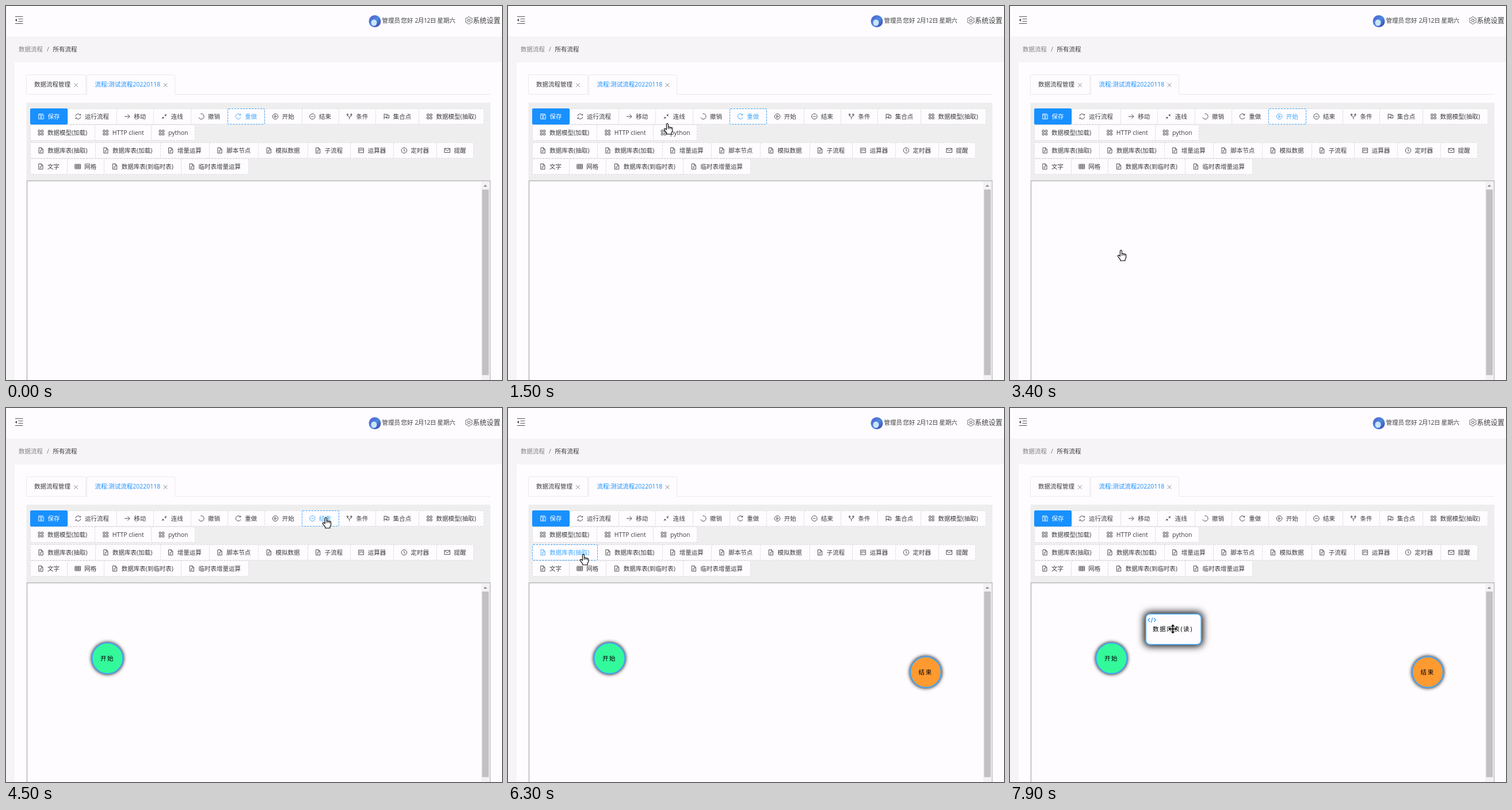
Animation, 862 px wide and 650 px high, one loop 8000 ms. Source, as an HTML page:

```html
<!DOCTYPE html>
<html lang="zh-CN">
<head>
<meta charset="utf-8">
<title>数据流程</title>
<style>
  html, body { margin: 0; width: 100%; height: 100%; overflow: hidden; background: #f6f4f6; }
  svg { display: block; width: 862px; height: 650px; }
  text { font: 10.5px "Open Sans", "Noto Sans CJK SC", "Noto Sans CJK JP", sans-serif; fill: #3c3c3c; white-space: pre; }
  .icon { fill: none; stroke: #444; stroke-width: .95; }
  .primary text { fill: #fff; }
  .primary .icon { stroke: #fff; }
  .active text { fill: #40a9ff; }
  .active .icon { stroke: #40a9ff; }
  .node text { fill: #000; font-weight: 500; letter-spacing: 1.6px; }
</style>
</head>
<body>
<svg id="stage" viewBox="0 0 862 650" xmlns="http://www.w3.org/2000/svg"></svg>
<script>
const WHITE = '#fefcff', BLUE = '#1890ff', LIGHT = '#40a9ff';
const LOOP = 8000, STEP = 100;

const rect = (x, y, w, h, attrs = '') => `<rect x="${x}" y="${y}" width="${w}" height="${h}" ${attrs}/>`;
const path = (d, attrs = '') => `<path d="${d}" ${attrs}/>`;
const label = (x, y, s, attrs = '') => `<text x="${x}" y="${y}" ${attrs}>${s}</text>`;

// Icons, each centred on 0,0
const circle = 'M-4.7 0a4.7 4.7 0 1 0 9.4 0a4.7 4.7 0 1 0-9.4 0';
const icons = {
  save: 'M-4.3-4.3H2.8L4.3-2.8V4.3H-4.3ZM-2-4.3V-1.6H2V-4.3M-1.4 1.6a1.4 1.4 0 1 0 2.8 0a1.4 1.4 0 1 0-2.8 0',
  sync: 'M-4.4-.6A4.4 4.4 0 0 1 3.6-2.6M4.4-4.4V-2.2H2.2M4.4.6A4.4 4.4 0 0 1-3.6 2.6M-4.4 4.4V2.2H-2.2',
  right: 'M-4.7 0H4.4M.6-3.8L4.4 0L.6 3.8',
  link: 'M-4.2 4.2L-1 1M1-1L4.2-4.2M-3.8 1.4H-1.2V4M1.4-3.8V-1.2H4',
  undo: 'M-1-4.5A4.6 4.6 0 1 1-4.3 1.6',
  redo: 'M3.6-2.8A4.5 4.5 0 1 0 4.2 1.6M4-4.8V-2.4H1.6',
  play: circle + 'M-1.3-2.1V2.1L2 0Z',
  minus: circle + 'M-2.3 0H2.3',
  fork: 'M-3.2-2.2V-1L0 1.5L3.2-1V-2.2M0 1.5V4.8M-4.2-4.2h2v2h-2ZM2.2-4.2h2v2h-2Z',
  flag: 'M-4-4.6V4.8M-4-3.8H1V1.4H-4M1-2.4H4.4V2.8H-.6V1.4',
  apps: 'M-4.2-4.2h3.2v3.2h-3.2ZM1-4.2h3.2v3.2H1ZM-4.2 1h3.2v3.2h-3.2ZM1 1h3.2v3.2H1Z',
  file: 'M-3.6-4.7H1L3.6-2V4.7H-3.6ZM.8-4.6V-1.8H3.5M-1.8.4H1.8M-1.8 2.4H.4',
  table: 'M-4.8-3.8H4.8V3.8H-4.8ZM-4.8-1.3H4.8M-4.8 1.2H4.8M-1.6-3.8V3.8M1.6-3.8V3.8',
  board: 'M-4.4-4H4.4V4H-4.4ZM-2.2-2.3V2M0-2.3V.2M2.2-2.3V1',
  clock: circle + 'M0-2.8V.3L2 1.6',
  mail: 'M-4.8-3.6H4.8V3.6H-4.8ZM-4.6-3L0 .6L4.6-3'
};

// Toolbar rows: top, left, then icon:text items
const rows = [
  [178.5, 42.3, 'save:保存 sync:运行流程 right:移动 link:连线 undo:撤销 redo:重做 play:开始 minus:结束 fork:条件 flag:集合点 apps:数据模型(抽取)'],
  [206.5, 41.7, 'apps:数据模型(加载) apps:HTTP_client apps:python'],
  [237.5, 42, 'file:数据库表(抽取) file:数据库表(加载) file:增量运算 file:脚本节点 file:模拟数据 file:子流程 board:运算器 clock:定时器 mail:提醒'],
  [265.5, 41.7, 'file:文字 table:网格 file:数据库表(到临时表) file:临时表增量运算']
];
const BTN_H = 27;
const buttons = {};

function textWidth(s) {
  if (s === 'HTTP client') return 54;
  if (s === 'python') return 33;
  return [...s].reduce((w, c) => w + ('()'.includes(c) ? 3.2 : 10.5), 0);
}

function toolbar() {
  let out = '';
  for (const [y, left, items] of rows) {
    let x = left;
    for (const item of items.split(' ')) {
      const [icon, raw] = item.split(':');
      const text = raw.replace('_', ' ');
      const next = x + 43.35 + textWidth(text);
      const edge = Math.round(x) + .5;
      const w = Math.round(next) + .5 - edge;
      const primary = icon === 'save';
      buttons[text] = { x: edge, y, w };
      out += `<g data-name="${text}" class="${primary ? 'primary' : ''}">`
        + rect(edge, y, primary ? w - 1 : w, BTN_H, primary ? `fill="${BLUE}" stroke="${BLUE}" rx="1.5"`
          : `fill="${WHITE}" stroke="#dcd8dd" stroke-width=".9" stroke-dasharray="3 2.2" rx="1.5"`)
        + path(icons[icon], `class="icon" transform="translate(${x + 18.7} ${y + 13.5})"`)
        + label(x + 30.3, y + 17.4, text) + '</g>';
      x = next;
    }
  }
  return out;
}

function gear(cx, cy) {
  let d = '';
  for (let i = 0; i < 48; i++) {
    const a = i / 48 * Math.PI * 2;
    const r = 5.7 + .9 * Math.cos(a * 6);
    d += (i ? 'L' : 'M') + (cx + r * Math.sin(a)).toFixed(2) + ' ' + (cy + r * Math.cos(a)).toFixed(2);
  }
  return path(d + 'Z', 'class="icon"') + `<circle cx="${cx}" cy="${cy}" r="2.2" class="icon"/>`;
}

const cross = (x, y) => path(`M${x - 3.2} ${y - 3.2}l6.4 6.4m0-6.4l-6.4 6.4`, 'stroke="#777" stroke-width=".9"');

function header() {
  return rect(1, 0, 861, 53, `fill="${WHITE}"`)
    + path('M15.8 18.5H29.5M21.5 22.5H29.5M21.5 26.5H29.5M15.8 30.5H29.5', 'stroke="#555" stroke-width="1"')
    + path('M19 21.9V27.1L15.8 24.5Z', 'fill="#444"')
    + '<circle cx="641" cy="26.5" r="10.5" fill="url(#avatar)"/>'
    + '<ellipse cx="639.5" cy="29" rx="5" ry="5.5" fill="#c9e6fa"/>'
    + label(653.5, 29, '管理员') + label(686.5, 29, '您好')
    + label(710.5, 29, '2月12日', 'style="letter-spacing:-.5px"') + label(749.5, 29, '星期六')
    + gear(804.4, 25) + label(811.3, 30, '系统设置', 'style="font-size:12px"')
    + label(22, 79, '数据流程', 'style="fill:#858386"') + label(71, 79, '/', 'style="fill:#777"')
    + label(81.5, 79, '所有流程');
}

function tabs() {
  const line = 'fill="none" stroke="#ebe8ec"';
  return rect(15, 98, 847, 552, `fill="${WHITE}"`)
    + path('M35.5 153.5V121.5a2 2 0 0 1 2-2H136.5a2 2 0 0 1 2 2V153.5H35.5', line)
    + path('M138 153.5H140.5V121.5a2 2 0 0 1 2-2H291.5a2 2 0 0 1 2 2V153.5H842', line)
    + label(49, 140, '数据流程管理') + cross(121.5, 137.5)
    + label(154.4, 140, '流程:测试流程20220118', `style="fill:${BLUE}"`) + cross(277, 137.5);
}

function board() {
  return rect(36.5, 303.8, 804.8, 360, `fill="${WHITE}" stroke="#b4b2b5" stroke-width="1.4"`)
    + rect(826, 305, 14.6, 345, 'fill="#f3f1f4"')
    + path('M829.8 314H836.2L833 310.4Z', 'fill="#8a888b"')
    + rect(827.4, 319, 11.6, 322.5, 'fill="#c3c0c4"');
}

function roundNode(id, x, y, fill, text) {
  const disc = (r, attrs) => `<circle cx="${x}" cy="${y}" r="${r}" ${attrs}/>`;
  return `<g id="${id}" class="node">` + disc(27.8, 'filter="url(#soft)"')
    + disc(26.7, `fill="${fill}" stroke="${LIGHT}" stroke-width="1.8"`)
    + label(x - 12.4, y + 4, text) + '</g>';
}

function tableNode() {
  return '<g id="table" class="node">'
    + rect(233, 355, 102, 59, 'rx="9" filter="url(#wide)"')
    + rect(236, 358, 96.2, 53, `rx="7" fill="${WHITE}" stroke="${LIGHT}" stroke-width="1.7"`)
    + path('M243 365.5L239.8 368.6L243 371.7M250.2 365.5L253.4 368.6L250.2 371.7M247.8 364.2L245.3 373',
      `fill="none" stroke="${BLUE}" stroke-width="1.1"`)
    + label(248, 388, '数据库表(读)') + '</g>';
}

function cursors() {
  const skin = 'fill="#fff" stroke="#000" stroke-width="1.1" stroke-linejoin="round"';
  return '<g id="arrow">' + path('M.5.5V16L4 12.7L6.4 18.3L8.8 17.3L6.4 11.7H11Z', skin) + '</g>'
    + '<g id="hand">' + path('M-1.6 11V1.9a1.5 1.5 0 0 1 3 0V6.7a1.4 1.4 0 0 1 2.6.3a1.4 1.4 0 0 1 2.5.6a1.3 1.3 0 0 1 2.2 1V13.5L7 16.4V18.8H-1.2V16.8L-5.4 11.4c-1-1.6.8-2.9 2-1.9Z', skin)
    + path('M1.4 6.5V10M4 7.2V10M6.5 8V10.4', 'stroke="#000" stroke-width=".9"') + '</g>'
    + '<g id="move">' + path('M0-8L3.4-4.4H.8V-.8H4.4V-3L7.6 0L4.4 3V.8H.8V4.4H3.4L0 8L-3.4 4.4H-.8V.8H-4.4V3L-7.6 0L-4.4-3V-.8H-.8V-4.4H-3.4Z',
      'fill="#000" stroke="#fff" stroke-width="1.2" paint-order="stroke"') + '</g>';
}

const blur = (id, dev) => `<filter id="${id}" x="-50%" y="-50%" width="200%" height="200%"><feGaussianBlur stdDeviation="${dev}"/></filter>`;

const stage = document.getElementById('stage');
stage.innerHTML = '<defs>' + blur('soft', 3.2) + blur('wide', 6.5)
  + '<linearGradient id="avatar" x2="1" y2="1"><stop stop-color="#5a55c8"/><stop offset=".5" stop-color="#4a8be0"/><stop offset="1" stop-color="#4238a8"/></linearGradient></defs>'
  + rect(0, 0, 862, 650, 'fill="#f6f4f6"')
  + header() + tabs() + rect(35.5, 168, 806.5, 135.5, 'fill="#eeeeee"') + toolbar() + board()
  + roundNode('start', 176.4, 435, '#33f99b', '开始')
  + roundNode('end', 726, 459, '#ff9a30', '结束') + tableNode()
  + rect(0, 0, 1, BTN_H, `id="wave" fill="none" stroke="${LIGHT}" rx="2"`)
  + rect(0, 0, 1, BTN_H, `id="ring" fill="none" stroke="${LIGHT}" stroke-dasharray="3 2" rx="1.5"`)
  + cursors();

const $ = id => document.getElementById(id);
const show = (id, on) => $(id).setAttribute('visibility', on ? 'visible' : 'hidden');
const set = (id, attrs) => Object.entries(attrs).forEach(([k, v]) => $(id).setAttribute(k, v));

// Pointer path: time, x, y
const trail = [
  [200, 845, 40], [500, 500, 200], [800, 150, 338], [1000, 122, 325], [1100, 107, 322],
  [1500, 277, 204], [1600, 282, 198], [1900, 233, 195], [2500, 491, 195], [2700, 491, 195],
  [3400, 193, 424], [3600, 548, 205], [3800, 554, 198], [4500, 556, 190], [4600, 556, 190],
  [5200, 743, 449], [5300, 743, 449], [6200, 132, 252], [6300, 131, 254], [6400, 133, 256],
  [6900, 301, 374], [7000, 301, 374], [7300, 127, 282], [7500, 460, 192], [7700, 310, 368], [7900, 283, 384]
];
const shapes = [[0, ''], [200, 'arrow'], [1400, 'hand'], [7100, 'arrow'], [7700, 'move']];
const focus = [[0, '重做'], [2800, '开始'], [3700, ''], [3900, '结束'], [5400, ''], [6200, '数据库表(抽取)'], [7100, '']];
const clicks = [[4700, '结束'], [6400, '数据库表(抽取)']];

const latest = (list, t) => list.filter(e => e[0] <= t).pop();

function pointer(t) {
  const i = trail.findIndex(k => k[0] > t);
  if (i < 0) return trail[trail.length - 1].slice(1);
  if (i === 0) return trail[0].slice(1);
  const [a, b] = [trail[i - 1], trail[i]];
  const p = (t - a[0]) / (b[0] - a[0]);
  return [1, 2].map(k => a[k] + (b[k] - a[k]) * p);
}

function draw(time) {
  const t = Math.floor(time % LOOP / STEP) * STEP;

  const name = latest(focus, t)[1];
  document.querySelectorAll('[data-name]').forEach(g => g.classList.toggle('active', g.dataset.name === name));
  show('ring', name);
  if (name) set('ring', { x: buttons[name].x, y: buttons[name].y, width: buttons[name].w });

  const click = latest(clicks, t);
  const age = click ? (t - click[0]) / 500 : 1;
  show('wave', age < 1);
  if (age < 1) {
    const { x, y, w } = buttons[click[1]];
    const s = 1 + 4 * Math.sqrt(age);
    set('wave', {
      x: x - s / 2, y: y - s / 2, width: w + s, height: BTN_H + s,
      'stroke-width': s, opacity: .22 * (1 - age)
    });
  }

  show('start', t >= 3700);
  show('end', t >= 5400);
  show('table', t >= 7100);

  const [x, y] = pointer(t);
  const shape = latest(shapes, t)[1];
  for (const id of ['arrow', 'hand', 'move']) {
    show(id, id === shape);
    set(id, { transform: `translate(${x.toFixed(1)} ${y.toFixed(1)})` });
  }
}

const begin = performance.now();
function tick() {
  draw(performance.now() - begin);
  requestAnimationFrame(tick);
}
tick();
</script>
</body>
</html>
```
